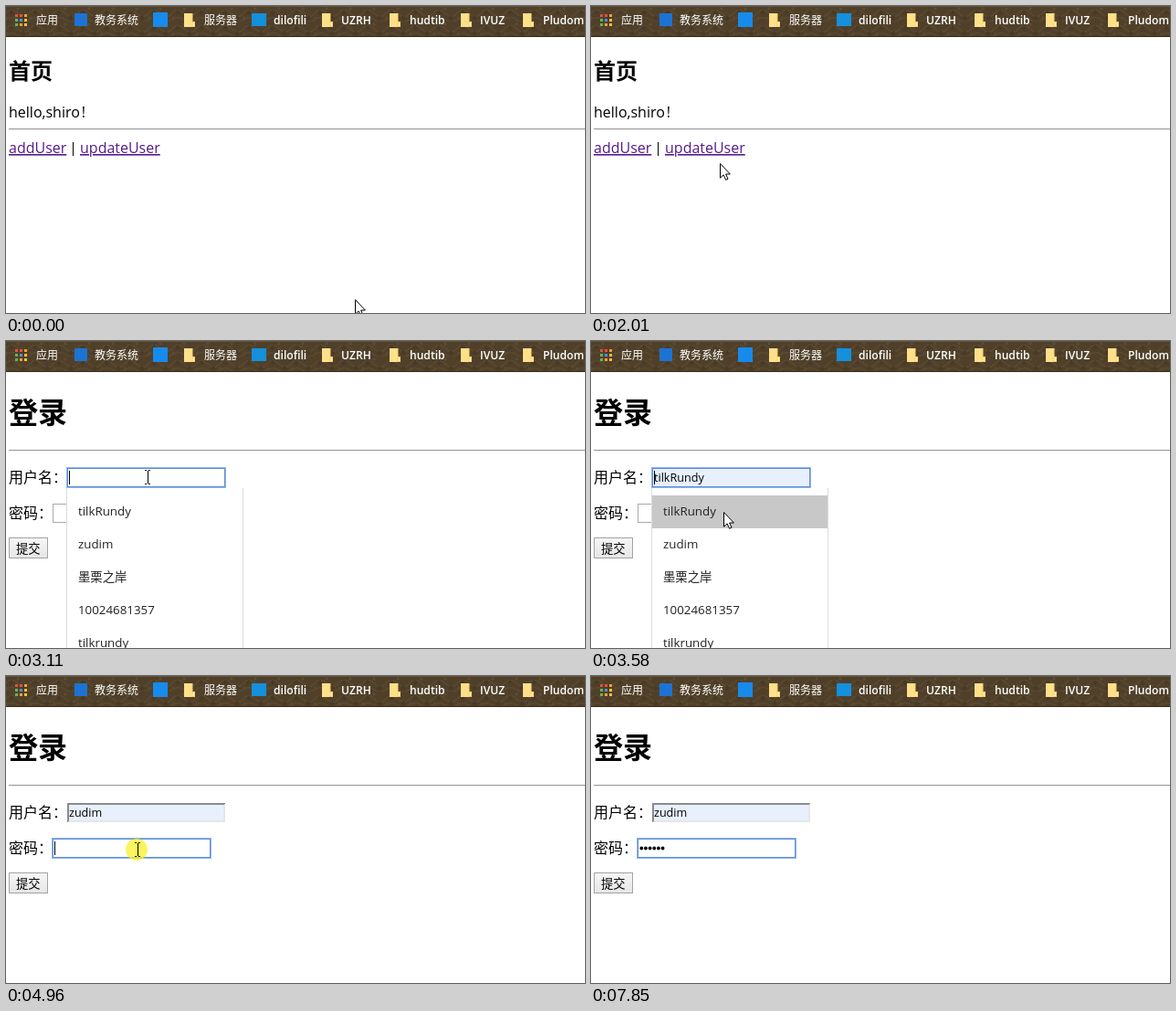
An HTML page for the animation above (8 s loop, 634 by 336 pixels).

```html
<!DOCTYPE html>
<html lang="zh-CN">
<head>
<meta charset="utf-8">
<title>登录</title>
<style>
  html, body { margin: 0; width: 100%; height: 100%; overflow: hidden; background: #fff; }
  svg { display: block; width: 634px; height: 336px; }
  text { font: 16px "Open Sans", "Noto Sans CJK SC", "Noto Sans CJK", sans-serif; fill: #000; }
  .crisp { shape-rendering: crispEdges; }
  .bar text { font-size: 12.1px; font-weight: 600; fill: #fff; }
  .bar .zh { font-size: 12px; font-weight: 500; }
  .link { fill: #551a8b; text-decoration: underline; }
  .h1 { font-size: 32px; font-weight: 700; }
  .h2 { font-size: 24px; font-weight: 700; }
  .input { font-size: 12.6px; }
  .button { font-size: 13.33px; }
  .menu text { font-size: 13.33px; fill: #222; }
</style>
</head>
<body>
<svg viewBox="0 0 634 336">
  <defs>
    <pattern id="damask" width="26" height="17" patternUnits="userSpaceOnUse">
      <rect width="26" height="17" fill="#50402a"/>
      <path d="M0 8Q6 1 13 8T26 8M0 15Q7 10 13 15T26 15" fill="none" stroke="#594930" stroke-width="1.6"/>
      <path d="M6 4l3 3-3 3-3-3zM19 10l3 3-3 3-3-3z" fill="#493a26"/>
      <path d="M13 1l2 2-2 2-2-2zM0 11l2 2-2 2z" fill="#5c4c33"/>
    </pattern>
    <linearGradient id="face" x2="0" y2="1">
      <stop stop-color="#f6f6f6"/><stop offset="1" stop-color="#e6e6e6"/>
    </linearGradient>
    <g id="folder">
      <path d="M0 0h9.5v9h2.5v6H0z" fill="#f7cf68"/>
      <path d="M0 0h8.5v15H0z" fill="#ffe08a"/>
      <path d="M9.5 10h1.5v4h-1.5z" fill="#fff0bd"/>
    </g>
    <g id="ring" class="crisp" fill="none">
      <rect x=".5" y=".5" width="174" height="22" rx="1" stroke="#8fb6f2"/>
      <rect x="1.5" y="1.5" width="172" height="20" stroke="#5f8bd0"/>
    </g>
  </defs>

  <g class="bar">
    <rect width="634" height="34" fill="url(#damask)"/>
    <rect width="634" height="1" fill="#65543a"/>
    <rect y="33" width="634" height="1" fill="#3a2e1d"/>
    <g id="apps"></g>
    <text class="zh" x="33" y="20">应用</text>
    <rect x="75" y="8" width="14" height="14" fill="#1c73d4"/>
    <text class="zh" x="97" y="20">教务系统</text>
    <rect x="161" y="7" width="16" height="16" fill="#168bec"/>
    <use href="#folder" x="195" y="8"/>
    <text class="zh" x="217" y="20">服务器</text>
    <rect x="269" y="8" width="16" height="14" fill="#1490dc"/>
    <text x="293" y="20">dilofili</text>
    <use href="#folder" x="346" y="8"/>
    <text x="367" y="20">UZRH</text>
    <use href="#folder" x="420" y="8"/>
    <text x="442" y="20">hudtib</text>
    <use href="#folder" x="498" y="8"/>
    <text x="519" y="20">IVUZ</text>
    <use href="#folder" x="566" y="8"/>
    <text x="588" y="20">Pludom</text>
  </g>

  <g id="home">
    <text class="h2" x="3" y="80">首页</text>
    <text x="3" y="122">hello,shiro<tspan dx="2">!</tspan></text>
    <g class="crisp">
      <rect x="3" y="134" width="631" height="1" fill="#9a9a9a"/>
      <rect x="3" y="135" width="631" height="1" fill="#eee"/>
    </g>
    <text class="link" x="3" y="161">addUser</text>
    <rect class="crisp" x="73" y="149" width="1" height="15"/>
    <text class="link" x="81" y="161">updateUser</text>
  </g>

  <g id="login" visibility="hidden">
    <text class="h1" x="3" y="90">登录</text>
    <g class="crisp">
      <rect x="3" y="119" width="631" height="1" fill="#9a9a9a"/>
      <rect x="3" y="120" width="631" height="1" fill="#eee"/>
    </g>
    <text x="3" y="154.5">用户名：</text>
    <text x="3" y="193.5">密码：</text>

    <rect id="userBox" class="crisp" x="67.5" y="139.5" width="172" height="20" fill="#fff" stroke="#a9a9a9"/>
    <g id="userInset" class="crisp">
      <rect x="67" y="139" width="173" height="21" fill="#e8f0fe"/>
      <path d="M67 139h173l-2 2H69v17l-2 2z" fill="#8a8a8a"/>
      <path d="M240 139v21H67l2-2h169v-17z" fill="#e6e6e6"/>
    </g>
    <use id="userRing" href="#ring" x="66" y="138"/>
    <text id="userText" class="input" x="69" y="154"></text>
    <rect id="userCaret" class="crisp" y="142" width="1" height="15"/>

    <rect class="crisp" x="51.5" y="178.5" width="172" height="20" fill="#fff" stroke="#a9a9a9"/>
    <use id="passRing" href="#ring" x="50" y="177"/>
    <g id="dots"></g>
    <rect id="passCaret" class="crisp" y="181" width="1" height="15"/>

    <rect class="crisp" x="3.5" y="215.5" width="42" height="22" fill="url(#face)" stroke="#a3a3a3"/>
    <text class="button" x="11" y="231.5">提交</text>
  </g>

  <g id="menu" class="menu" visibility="hidden">
    <rect class="crisp" x="66" y="161" width="194" height="175" fill="#dcdcdc"/>
    <rect class="crisp" x="67" y="161" width="192" height="175" fill="#fff"/>
    <rect id="hover" class="crisp" x="67" width="192" height="36" fill="#c8c8c8"/>
  </g>

  <circle id="halo" r="12" fill="#fbf02a" opacity=".75"/>
  <g id="cursor">
    <path id="arrow" d="M.5.5V16.2L4.1 12.9L6.6 18.3L9 17.2L6.6 12H11.4Z" fill="#fff" stroke="#000"/>
    <path id="beam" class="crisp" d="M-3 -7.5H-1M1 -7.5H3M-3 7.5H-1M1 7.5H3M.5 -7V7" fill="none" stroke="#000"/>
    <path id="hand" d="M-1.5 1.5Q0-.8 1.5 1.5V7.5L9 9.5Q11 10.5 10.5 14L9 19H0L-5.5 12Q-5.5 9.5-3.5 10.5L-1.5 12Z" fill="#fff" stroke="#000"/>
  </g>
</svg>

<script>
const LOOP = 8000, NS = 'http://www.w3.org/2000/svg';
const $ = id => document.getElementById(id);
const set = (el, attrs) => { for (const k in attrs) el.setAttribute(k, attrs[k]); };
const show = (id, on) => $(id).style.display = on ? 'inline' : 'none';

function add(parent, tag, attrs, text = '') {
  const el = document.createElementNS(NS, tag);
  set(el, attrs);
  el.textContent = text;
  return parent.appendChild(el);
}

['#e5503f', '#e5503f', '#f0a030', '#5cb85c', '#4a90e2', '#f2c230', '#5cb85c', '#f0a030', '#f2c230']
  .forEach((fill, i) => add($('apps'), 'rect',
    { x: 10 + i % 3 * 5, y: 9 + (i / 3 | 0) * 5, width: 3, height: 3, fill }));

const users = ['tilkRundy', 'zudim', '墨栗之岸', '10024681357', 'tilkrundy'];
users.forEach((name, i) => add($('menu'), 'text', { x: 79, y: 191 + i * 36 }, name));

const keys = [5820, 6050, 6280, 6510, 6750, 6980], PITCH = 4.65;
const dots = keys.map((_, i) => add($('dots'), 'circle', { cx: 55.3 + i * PITCH, cy: 188.5, r: 1.9 }));

// Pointer moves: first step, last step, number of steps, waypoints
const moves = [
  [0, 0, 1, [[382, 321]]],
  [70, 230, 3, [[215, 238], [2, 166], [38, 153]]],
  [530, 1320, 11, [[40, 150], [44, 122], [36, 132], [34, 158], [48, 176]]],
  [1400, 1630, 4, [[58, 182], [86, 186], [118, 181], [134, 177]]],
  [2010, 2010, 1, [[141, 172]]],
  [2560, 2870, 5, [[139, 165], [137, 156], [155, 149]]],
  [3500, 3660, 3, [[150, 171], [145, 187], [147, 190]]],
  [4130, 4350, 4, [[147, 198], [147, 206], [148, 212], [149, 214]]],
  [4655, 4810, 3, [[148, 208], [146, 196], [144, 190]]],
  [7680, 7850, 3, [[96, 174], [5, 150], [-40, 140]]]
];

function pointer(t) {
  const [a, b, n, pts] = moves.filter(m => m[0] <= t).pop();
  if (n < 2) return pts[0];
  // Screen captures are not quite evenly spaced, hence the slack
  const step = Math.min(n - 1, Math.floor((t - a) / (b - a) * (n - 1) + 0.15));
  const u = step / (n - 1) * (pts.length - 1);
  const i = Math.min(pts.length - 2, Math.floor(u));
  return [0, 1].map(k => Math.round(pts[i][k] + (pts[i + 1][k] - pts[i][k]) * (u - i)));
}

const inside = (x, y, l, t, r, b) => x >= l && x < r && y >= t && y < b;

function shape(x, y, home, open) {
  if (home) {
    if (inside(x, y, 3, 147, 67, 166) || inside(x, y, 81, 147, 169, 166)) return 'hand';
    return inside(x, y, 3, 108, 90, 126) ? 'beam' : 'arrow';
  }
  const field = inside(x, y, 67, 139, 240, 160) || !open && inside(x, y, 51, 178, 224, 199);
  return field ? 'beam' : 'arrow';
}

function draw(t) {
  const within = (a, b) => t >= a && t < b;
  const home = t < 2180, open = within(3110, 4577);
  const [x, y] = pointer(t);
  const kind = shape(x, y, home, open);
  const row = open && y >= 169 ? Math.floor((y - 169) / 36) : -1;
  const name = t >= 4577 ? users[1] : row >= 0 ? users[row] : '';

  show('home', home);
  $('login').setAttribute('visibility', home ? 'hidden' : 'visible');
  $('menu').setAttribute('visibility', open ? 'visible' : 'hidden');
  show('hover', row >= 0);
  if (row >= 0) set($('hover'), { y: 169 + row * 36 });

  const text = $('userText');
  if (text.textContent !== name) text.textContent = name;
  $('userBox').setAttribute('fill', name ? '#e8f0fe' : '#fff');
  show('userRing', within(3050, 4960));
  show('userInset', t >= 4960);
  show('userCaret', within(3050, 4130) || within(4577, 4960));
  set($('userCaret'), { x: t < 4577 ? 69 : 106 });

  const typed = keys.filter(k => k <= t).length;
  dots.forEach((d, i) => d.style.display = i < typed ? 'inline' : 'none');
  show('passRing', t >= 4960);
  show('passCaret', within(4960, 5500) || within(5820, 7530));
  set($('passCaret'), { x: Math.round(53 + typed * PITCH) });

  show('halo', within(3050, 3110) || within(4500, 4577) || within(4960, 5120));
  set($('halo'), { cx: x - 1, cy: y });
  for (const id of ['arrow', 'beam', 'hand']) show(id, id === kind);
  set($('cursor'), { transform: `translate(${x} ${y})` });
}

const start = performance.now();
function tick() {
  draw((performance.now() - start) % LOOP);
  requestAnimationFrame(tick);
}
draw(0);
requestAnimationFrame(tick);
</script>
</body>
</html>
```
